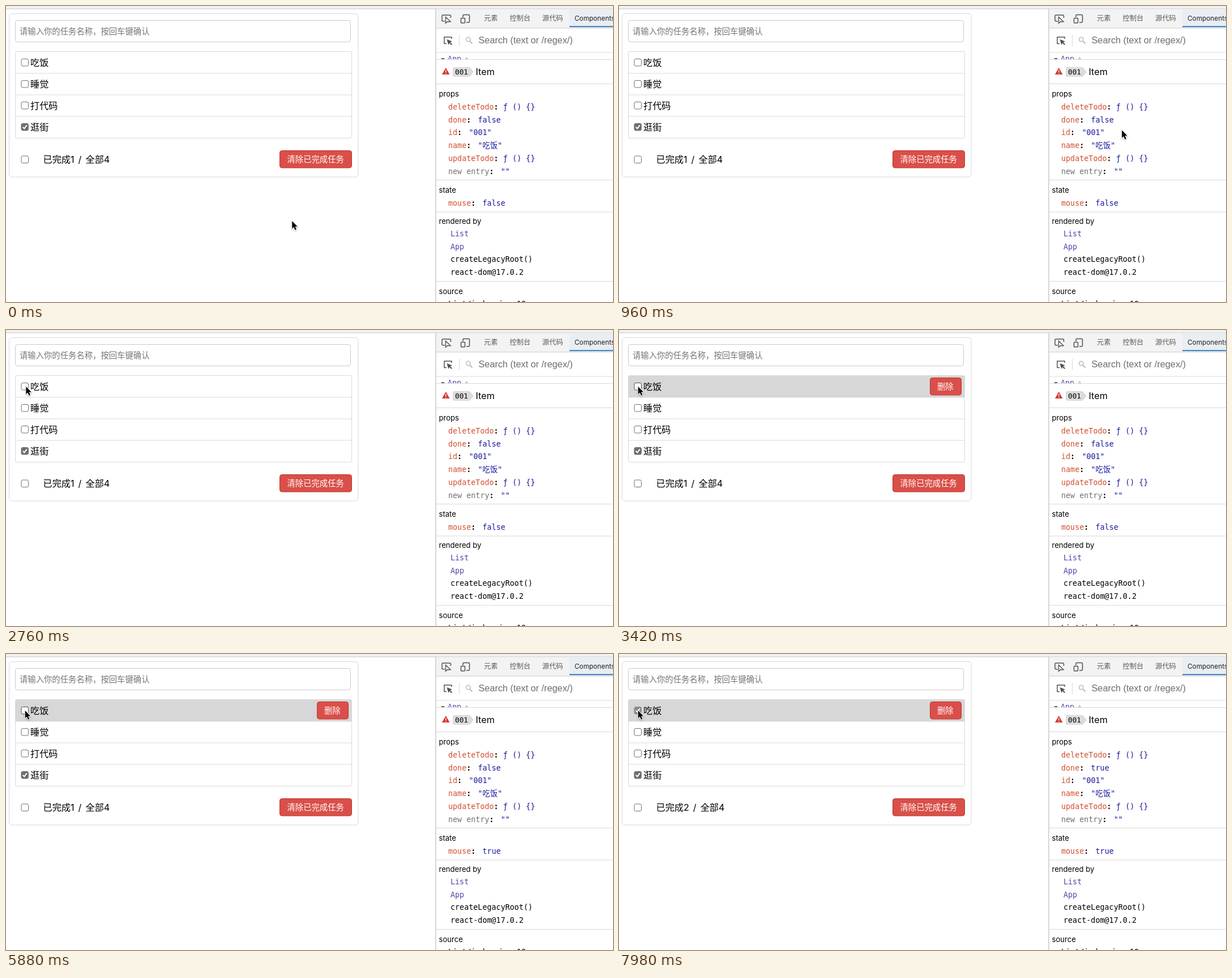
Write an HTML page that moves like this. It is 1072 px wide and 523 px high and loops after 8 s.

```html
<!DOCTYPE html>
<html lang="zh-CN">
<head>
<meta charset="utf-8">
<title>Todo list</title>
<style>
  html, body { margin: 0; width: 100%; height: 100%; overflow: hidden; background: #fff; }
  svg { display: block; width: 1072px; height: 523px; }
  text { font-family: Inter, "Noto Sans CJK SC", sans-serif; white-space: pre; }
  .mono { font: 13.4px "DejaVu Sans Mono", "Noto Sans CJK SC", monospace; }
  .label { font-size: 13.1px; }
  .item { font-size: 16.2px; }
  .small { font-size: 14.35px; }
  .tab { font-size: 12.3px; fill: #5a5d61; }
  .key { fill: #d2502f; }
  .value { fill: #1a1aa0; }
  .type { fill: #5246a8; }
  .muted { fill: #707070; }
  .line { fill: none; stroke: #d9d9d9; }
  .icon { fill: none; stroke: #4d5156; stroke-width: 1.5; }
  .button rect { fill: #da4f49; stroke: #bd362f; }
  .button text { fill: #fff; }
  .tick { fill: none; stroke: #fff; stroke-width: 2; }
</style>
</head>
<body>
<svg viewBox="0 0 1072 523">
  <rect width="1072" height="5" fill="#f1f1f1"/>
  <path d="M0 5H1072" stroke="#c8c8c8"/>

  <!-- todo card -->
  <rect class="line" x="5.5" y="13.5" width="616.5" height="288.5" rx="5"/>
  <rect x="16.5" y="25.5" width="592" height="38" rx="4" fill="#fff" stroke="#c9c9c9"/>
  <text class="small" x="24" y="49.8" fill="#757575">请输入你的任务名称，按回车键确认</text>
  <rect id="hover" x="17" y="81" width="593.5" height="38" fill="#d7d7d7"/>
  <rect class="line" x="16.5" y="80.5" width="594" height="153" rx="2"/>
  <path class="line" d="M17 119H610M17 157H610M17 195H610"/>
  <g id="rows"></g>
  <text class="item" y="277"><tspan id="count" x="65.5"></tspan><tspan id="slash">/</tspan><tspan id="total">全部4</tspan></text>
  <g class="button">
    <rect x="483.5" y="255.5" width="127" height="30.5" rx="4"/>
    <text class="small" x="496.5" y="276.2">清除已完成任务</text>
  </g>
  <g class="button" id="remove">
    <rect x="549.5" y="84.5" width="55" height="30.5" rx="4"/>
    <text class="small" x="562" y="105.2">删除</text>
  </g>

  <!-- developer tools -->
  <rect x="760" y="5.5" width="312" height="33.5" fill="#f3f3f3"/>
  <rect x="995" y="5.5" width="77" height="30.5" fill="#e9eef2"/>
  <path d="M760 39H1072" stroke="#cbcbcb"/>
  <path d="M995 36.3H1072" stroke="#1a6fb5" stroke-width="1.8"/>
  <path d="M759 5V523" stroke="#cacaca" stroke-width="1.5"/>
  <path class="icon" d="M775 27H772Q770 27 770 25V18Q770 16 772 16H783.500Q785.500 16 785.500 18V21"/>
  <path d="M776.500 19.500V30.500L779.500 27.800H785Z" fill="#fff" stroke="#4d5156" stroke-width="1.4"/>
  <path class="icon" d="M807 20V17Q807 15.500 808.500 15.500H817Q818.500 15.500 818.500 17V27Q818.500 29 817 29H813"/>
  <rect class="icon" x="803.500" y="21.500" width="7" height="8.500" rx="1"/>
  <text class="tab" x="844" y="26.200">元素</text>
  <text class="tab" x="889.500" y="26.200">控制台</text>
  <text class="tab" x="947" y="26.200">源代码</text>
  <text x="1004" y="25.800" font-size="11.800" fill="#202124">Components</text>

  <path class="icon" d="M778 66.500H774V55H787V58" stroke-width="1.300"/>
  <path d="M778.500 59 788 62.500 784.500 64 788 67.500 786.500 69 783 65.500 781.500 69Z" fill="#4d5156"/>
  <path class="line" d="M800.500 51V71M760 82H1072M760 94.500H1072M760 137.500H1072M760 307.500H1072M760 364H1072M760 486.500H1072"/>
  <circle cx="816.300" cy="59" r="3.700" fill="none" stroke="#bbb" stroke-width="1.500"/>
  <path d="M819 62 823.500 66.500" stroke="#bbb" stroke-width="2"/>
  <text x="834.500" y="66" font-size="16.300" fill="#6e6e6e" style="font-family:'Liberation Sans',sans-serif">Search (text or /regex/)</text>
  <clipPath id="tree"><rect x="760" y="82" width="312" height="12"/></clipPath>
  <g clip-path="url(#tree)">
    <path d="M768 92H775L771.500 96Z" fill="#666"/>
    <text class="mono type" x="780" y="98">App</text>
    <path d="M809 97 813.500 89.500 818 97Z" fill="#c9c9c9"/>
  </g>
  <path d="M776.800 109 783.500 121H770Z" fill="#d33a31"/>
  <path d="M776.800 113V117M776.800 118V119.500" stroke="#fff" stroke-width="1.300"/>
  <path d="M791 108H819L826 116.500 819 125H791Q789 125 789 123V110Q789 108 791 108Z" fill="#dcdcdc"/>
  <text class="mono" x="793" y="120.700" style="font-size:12.700px">001</text>
  <text x="829.500" y="122.300" font-size="16.200">Item</text>
  <g id="panel"></g>

  <path id="cursor" d="M0 0V13.400L3 10.600 5.300 15.800 7.600 14.800 5.300 9.700H9.400Z" stroke="#fff" stroke-width="2" paint-order="stroke" style="filter:drop-shadow(0 1px 1px #0005)"/>
</svg>
<script>
const LOOP = 8000, STEP = 60, CHAR = 8.06;
const $ = id => document.getElementById(id);
const put = (id, markup) => $(id).insertAdjacentHTML('beforeend', markup);

function addCheckbox(id, y) {
  put('rows', `<g id="${id}">
    <rect x="27" y="${y - 6}" width="12.5" height="12.5" rx="2.5"/>
    <path class="tick" d="M29.8 ${y + 0.4}l2.5 2.6 4.5-5.8"/></g>`);
}

function setCheckbox(id, checked, color) {
  const [box, tick] = $(id).children;
  box.setAttribute('fill', checked ? color : '#fff');
  box.setAttribute('stroke', color);
  tick.style.visibility = checked ? 'visible' : 'hidden';
}

['吃饭', '睡觉', '打代码', '逛街'].forEach((name, i) => {
  const y = 99.5 + 38 * i;
  addCheckbox('check' + i, y);
  put('rows', `<text class="item" x="43" y="${y + 6.6}">${name}</text>`);
  setCheckbox('check' + i, i === 3, '#707070');
});
addCheckbox('checkAll', 271);
setCheckbox('checkAll', false, '#707070');

const text = (x, y, cls, content, id = '') =>
  put('panel', `<text id="${id}" class="${cls}" x="${x}" y="${y}">${content}</text>`);

function addEntry(y, key, value, id, cls = 'key') {
  const colon = 781 + key.length * CHAR;
  text(781, y, 'mono ' + cls, key);
  put('panel', `<text class="mono" x="${colon}" y="${y}" style="font-weight:bold">:</text>`);
  text(colon + CHAR + (value[0] === 'ƒ' ? 8.4 : 12.2), y, 'mono value', value, id);
}

[['props', 160], ['state', 330], ['rendered by', 385], ['source', 509]]
  .forEach(([title, y]) => text(764.5, y, 'label', title));
[['deleteTodo', 'ƒ () {}'], ['done', 'false', 'done'], ['id', '"001"'], ['name', '"吃饭"'],
 ['updateTodo', 'ƒ () {}'], ['new entry', '""', '', 'muted']]
  .forEach(([key, value, id, cls], i) => addEntry(183 + 22.7 * i, key, value, id, cls));
addEntry(353, 'mouse', 'false', 'mouse');
['List', 'App', 'createLegacyRoot()', 'react-dom@17.0.2']
  .forEach((name, i) => text(785, 407 + 22.6 * i, i < 2 ? 'mono type' : 'mono', name));
text(781, 530.5, 'mono', 'List/index.jsx:18');

// pointer path: time, x, y
const path = [
  [0, 505.3, 380], [60, 565, 348], [120, 655, 305], [240, 655, 305], [480, 825, 252],
  [720, 865, 216], [960, 888.2, 219.6], [1080, 872, 213], [1200, 824, 208], [1320, 850, 246],
  [1440, 880, 215], [1680, 880, 215], [1740, 765, 226], [1800, 575, 241], [1860, 363.3, 252],
  [1920, 225, 246], [2040, 135, 215], [2280, 80, 160], [2520, 48, 118], [2760, 35.4, 100],
  [3360, 35.4, 100], [3420, 33.8, 100], [LOOP, 33.8, 100]
];

function pointer(t) {
  const i = path.findIndex(p => p[0] > t);
  const [t0, x0, y0] = path[i - 1], [t1, x1, y1] = path[i];
  const k = (t - t0) / (t1 - t0);
  return [x0 + (x1 - x0) * k, y0 + (y1 - y0) * k];
}

function render(now) {
  const t = Math.floor(now % LOOP / STEP) * STEP;
  const within = (from, to = LOOP) => t >= from && t < to;
  const hovered = within(3420);
  const checked = within(3540, 4980) || within(6600);
  const pressed = within(3480, 3540) || within(4860, 4980) || within(6540, 6600) || within(7920);
  const shift = checked ? 3.2 : 0;

  $('cursor').setAttribute('transform', `translate(${pointer(t)})`);
  $('hover').style.display = $('remove').style.display = hovered ? '' : 'none';
  setCheckbox('check0', checked, pressed ? '#8b8b8b' : hovered ? '#4d4d4d' : '#707070');
  $('count').textContent = '已完成' + (checked ? 2 : 1);
  $('slash').setAttribute('x', 127.5 + shift);
  $('total').setAttribute('x', 140.5 + shift);
  $('done').textContent = within(4080, 5880) || within(6780);
  $('mouse').textContent = within(4080);
  requestAnimationFrame(() => render(performance.now()));
}
render(performance.now());
</script>
</body>
</html>
```
